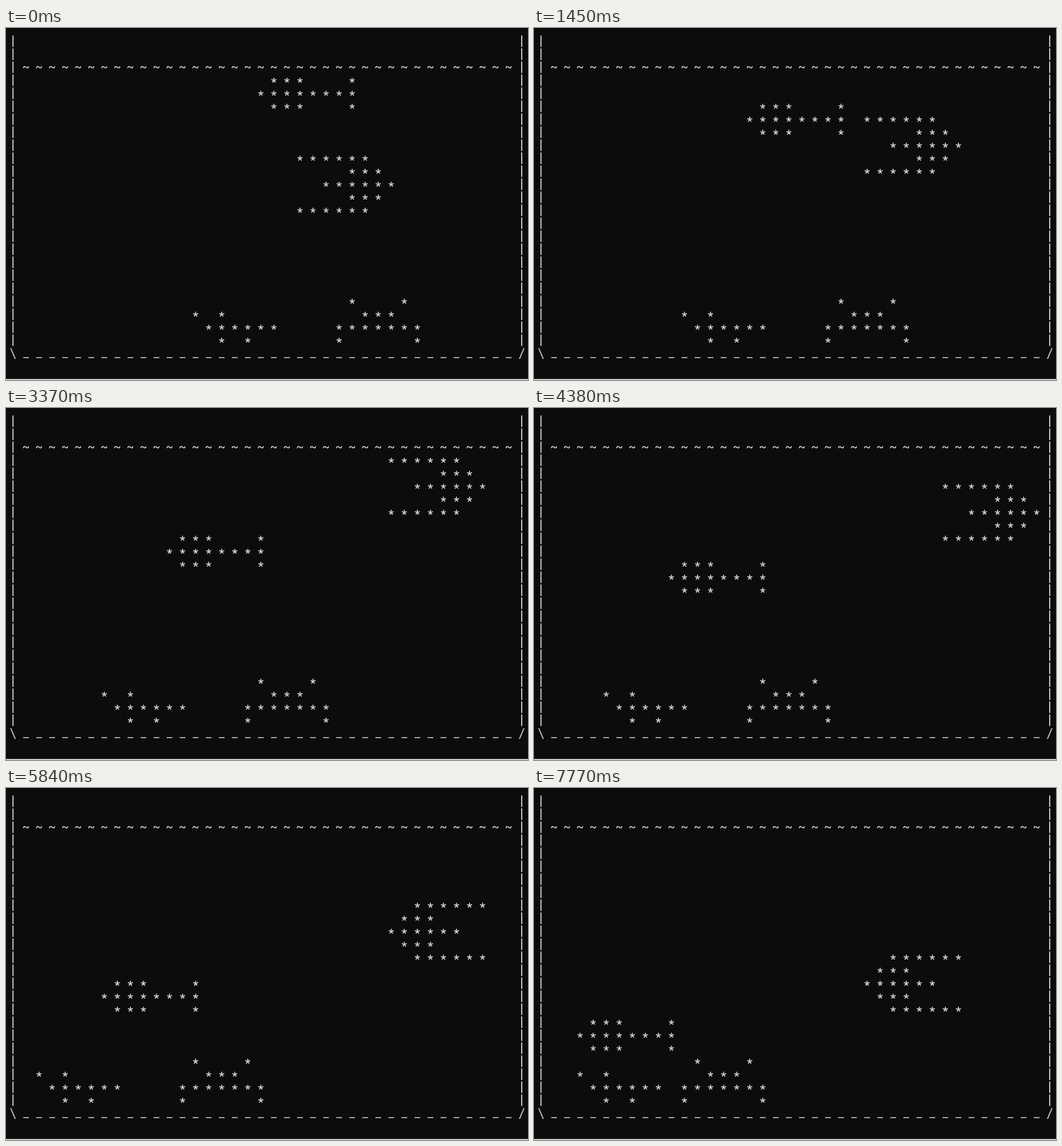
Write an HTML page with a canvas that moves like this. It is 910 px wide and 615 px high and loops after 8 s.

```html
<!DOCTYPE html>
<html lang="en">
<head>
<meta charset="utf-8">
<title>Terminal aquarium</title>
<style>
  html, body { margin: 0; width: 100%; height: 100%; overflow: hidden; background: #0c0c0c; }
  canvas { display: block; }
</style>
</head>
<body>
<canvas id="tank" width="910" height="615"></canvas>
<script>
const ctx = document.getElementById('tank').getContext('2d');
const INK = '#cccccc', PAPER = '#0c0c0c';
const LOOP = 8000;
const STEPS = [0, 450, 920, 1450, 1910, 2440, 2900, 3370, 3840, 4380,
  4840, 5370, 5840, 6370, 6840, 7310, 7770];
const COLS = 40, FLOOR = 24, SURFACE = 2;

const colX = c => 12.2 + 22.74 * c;
const rowY = r => 23.45 + 22.71 * r;

// Character shapes, relative to the centre of their cell
const star = new Path2D();
for (let i = 0; i < 5; i++) {
  const a = (i * 72 - 90) * Math.PI / 180;
  star.moveTo(0, 0);
  star.lineTo(4.6 * Math.cos(a), 4.6 * Math.sin(a));
}
const glyphs = {
  '*': [star, 1.8],
  '~': [new Path2D('M-4.6 1.4C-4.4 -1.9 -2.2 -2.3 -.2 -.5S4 1.7 4.5 -2'), 1.8],
  '|': [new Path2D('M0 -10.4V9.8'), 2],
  '_': [new Path2D('M-5 7.4H5'), 1.6],
  '\\': [new Path2D('M-4 -9L4 9.7'), 1.8],
  '/': [new Path2D('M4 -9L-4 9.7'), 1.8]
};

function put(ch, c, r) {
  if (!glyphs[ch]) return;
  const [path, weight] = glyphs[ch];
  ctx.save();
  ctx.translate(colX(c), rowY(r));
  ctx.lineWidth = weight;
  ctx.stroke(path);
  ctx.restore();
}

const mirror = rows => rows.map(s => [...s].reverse().join(''));

const slim = [' ***   *', '********', ' ***   *'];
const wide = ['******  ', '    *** ', '  ******', '    *** ', '******  '];
const lobster = ['* *    ', ' ******', '  * *  '];
const crab = [' *   * ', '  ***  ', '*******', '*     *'];

function draw(rows, c, r) {
  rows.forEach((s, j) => [...s].forEach((ch, i) => put(ch, c + i, r + j)));
}

function drawTank() {
  ctx.fillStyle = PAPER;
  ctx.fillRect(0, 0, 910, 615);
  ctx.fillStyle = '#f2f2f2';
  ctx.fillRect(0, 613.4, 910, 1.6);
  ctx.strokeStyle = INK;
  for (let r = 0; r < FLOOR; r++) {
    put('|', 0, r);
    put('|', COLS - 1, r);
  }
  for (let c = 1; c < COLS - 1; c++) {
    put('~', c, SURFACE);
    put('_', c, FLOOR);
  }
  put('\\', 0, FLOOR);
  put('/', COLS - 1, FLOOR);
}

// Every animal moves one cell per step and rests one step when it turns
function drawStep(k) {
  drawTank();
  draw(slim, 19 - k, Math.min(17, Math.max(3, k + 2)));

  const wideRow = k < 7 ? 9 - k : k - 4;
  if (k < 10) draw(wide, 22 + k, wideRow);
  else draw(mirror(wide), 41 - k, wideRow);

  const lobsterCol = k < 14 ? 14 - k : k - 13;
  draw(k === 14 || k === 15 ? mirror(lobster) : lobster, lobsterCol, 21);

  draw(crab, 10 + Math.abs(15 - k), 20);
}

const start = performance.now();
let shown = -1;

function tick() {
  const t = (performance.now() - start) % LOOP;
  const k = STEPS.filter(s => s <= t).length - 1;
  if (k !== shown) drawStep(shown = k);
  requestAnimationFrame(tick);
}
tick();
</script>
</body>
</html>
```
